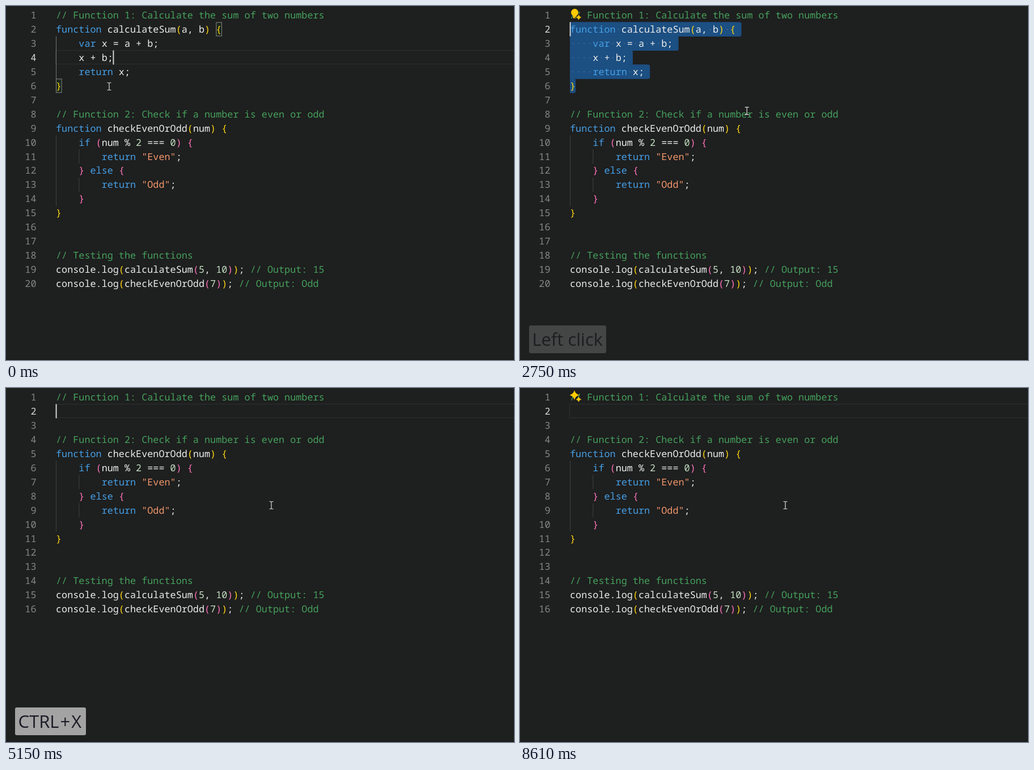
Write an HTML page that moves like this. It is 896 px wide and 625 px high and loops after 9.14 s.

```html
<!DOCTYPE html>
<html lang="en">
<head>
<meta charset="utf-8">
<title>Cutting a function</title>
<style>
html, body { margin: 0; width: 100%; height: 100%; overflow: hidden; background: #1e1f1f; }
svg { display: block; width: 100%; height: 100%; }
.mono { font: 16.808px "Noto Sans Mono", "DejaVu Sans Mono", monospace; text-rendering: geometricPrecision; }
.mono text { white-space: pre; }
.code { font-weight: 500; }
.badge { font: 31px "Open Sans", "Noto Sans", sans-serif; }
</style>
</head>
<body>
<svg id="stage" viewBox="0 0 896 625">
  <rect width="896" height="625" fill="#1e1f1f"/>
  <rect y="623" width="896" height="2" fill="#191a1a"/>
  <g id="back"></g>
  <g id="numbers" class="mono" text-anchor="end"></g>
  <g id="before" class="mono code"></g>
  <g id="after" class="mono code"></g>
  <g id="front"></g>
</svg>
<script>
const LOOP = 9140, LEFT = 88, CHAR = 10.085, ROW = 24.97;
const PRESS = 740, RELEASE = 1850, CUT = 5080;

const full = `// Function 1: Calculate the sum of two numbers
function calculateSum(a, b) {
    var x = a + b;
    x + b;
    return x;
}

// Function 2: Check if a number is even or odd
function checkEvenOrOdd(num) {
    if (num % 2 === 0) {
        return "Even";
    } else {
        return "Odd";
    }
}


// Testing the functions
console.log(calculateSum(5, 10)); // Output: 15
console.log(checkEvenOrOdd(7)); // Output: Odd`.split("\n");
const trimmed = [full[0], "", ...full.slice(6)];

const $ = id => document.getElementById(id);
const rowY = row => 3.5 + (row - 1) * ROW;
const colX = col => LEFT + col * CHAR;
const clamp = (v, lo, hi) => Math.min(hi, Math.max(lo, v));
const rect = (x, y, w, h, attrs) =>
  `<rect x="${x}" y="${y}" width="${w}" height="${h}" ${attrs}/>`;

// Syntax colouring, with bracket colours by nesting depth
function paint(lines) {
  const tokens = /(\/\/.*)|("[^"]*")|\b(function|var|return|if|else)\b|\b(\d+)\b|([({])|([)}])|[^\s]|\s+/g;
  const pair = ["#ffd710", "#ff72b8", "#179fff"];
  let depth = 0;
  return lines.map((line, i) => {
    const code = line.trimStart(), indent = line.length - code.length;
    const spans = code.replace(tokens, (s, note, str, key, num, open, close) => {
      const color = note ? "#45a05c" : str ? "#f0966a" : key ? "#459fe6" : num ? "#c4dfc2"
        : open ? pair[depth++ % 3] : close ? pair[--depth % 3] : "";
      return color ? `<tspan fill="${color}">${s}</tspan>` : s;
    });
    return `<text x="${colX(indent)}" y="${rowY(i + 1) + 18.3}" fill="#ececec">${spans}</text>`;
  }).join("");
}

function star(x, y, r) {
  const k = r * 0.22;
  return `M${x} ${y - r}Q${x + k} ${y - k} ${x + r} ${y}Q${x + k} ${y + k} ${x} ${y + r}` +
    `Q${x - k} ${y + k} ${x - r} ${y}Q${x - k} ${y - k} ${x} ${y - r}Z`;
}

// Pointer way-points: time, x, y
const path = [
  [0, 182, 142], [70, 182, 142], [200, 179, 142], [600, 179, 142], [740, 99, 142],
  [1060, 98, 141], [1290, 74, 83], [1490, 66, 52], [1700, 54, 40], [1960, 50, 35],
  [2190, 50, 35], [2450, 130, 80], [2750, 400, 185], [3080, 468, 207], [LOOP, 468, 207]
];
function pointerAt(t) {
  const i = Math.max(1, path.findIndex(p => p[0] >= t));
  const [t0, x0, y0] = path[i - 1], [t1, x1, y1] = path[i];
  const k = (t - t0) / (t1 - t0);
  return { x: x0 + (x1 - x0) * k, y: y0 + (y1 - y0) * k };
}

function caretAt(t) {
  if (t < PRESS) return { row: 4, col: 10, on: t < 340 };
  if (t >= CUT) {
    const flips = [5610, 6140, 6680, 7150, 7610, 8140, 8610];
    return { row: 2, col: 0, on: flips.filter(f => t >= f).length % 2 === 0 };
  }
  if (t >= 1500) return { row: 2, col: 0, on: Math.floor((t - 1500) / 530) % 2 === 0 };
  const p = pointerAt(t);
  const row = clamp(Math.floor((p.y - 3.5) / ROW) + 1, 2, 6);
  const col = clamp(Math.round((p.x - LEFT) / CHAR), 0, full[row - 1].length);
  return { row, col, on: true };
}

function guides(shift, lit) {
  const bar = (x, from, to, color) =>
    rect(x, rowY(from - shift), 1, (to - from + 1) * ROW, `fill="${color}"`);
  const block = bar(LEFT, 10, 14, "#404141") + bar(colX(4), 11, 11, "#404141") + bar(colX(4), 13, 13, "#404141");
  return block + (shift ? "" : bar(LEFT, 3, 5, lit ? "#747474" : "#404141"));
}

function selection(caret) {
  let out = "", dots = "";
  for (let row = caret.row; row <= 6; row++) {
    const line = full[row - 1];
    const from = row === caret.row ? caret.col : 0;
    const x = colX(from), w = (line.length - from + (row < 6 ? 1 : 0)) * CHAR;
    if (w <= 0) continue;
    const fill = 'fill="#1c4f82"';
    out += rect(x, rowY(row), w, ROW + 0.3, fill + ' rx="3"');
    out += rect(x, rowY(row), w - 4, ROW + 0.3, fill);
    for (let c = from; c < line.length; c++) {
      if (line[c] === " ")
        dots += `<circle cx="${colX(c + 0.5)}" cy="${rowY(row) + 12.8}" r="1" fill="#47709a"/>`;
    }
  }
  return out + dots;
}

function bracketBox(row, col) {
  return rect(colX(col) + 0.5, rowY(row) + 0.5, CHAR - 0.5, ROW - 1,
    'fill="#006400" fill-opacity=".12" stroke="#888"');
}

function badge(t) {
  let label, width, alpha = 1;
  if (t >= PRESS && t < 3620) [label, width, alpha] = ["Left click", 136, 1 - (t - 900) / 2600];
  else if (t >= 4420 && t < CUT) [label, width] = ["CTRL", 85];
  else if (t >= CUT) [label, width, alpha] = ['CTRL<tspan dx="2">+</tspan><tspan dx="2">X</tspan>', 125, 1 - (t - 5800) / 2340];
  if (!label || alpha <= 0) return "";
  return `<g opacity="${Math.min(1, alpha)}">` + rect(16, 564, width, 49, 'rx="3" fill="#a3a3a3"') +
    `<text class="badge" x="21.5" y="599.5" fill="#1b1b26">${label}</text></g>`;
}

function hintIcon(t) {
  const gold = 'fill="#ffcc00"', rim = 'stroke="#1e1f1f" stroke-width="1.5" paint-order="stroke"';
  if (t >= 5410)
    return `<path d="${star(96, 12.5, 8.5)}${star(103.5, 20, 5)}" ${gold}/>`;
  if (t < 1880 || t >= CUT) return "";
  return `<circle cx="96.5" cy="11.5" r="6.5" ${gold}/>` + rect(93.5, 16, 6, 5.5, gold + ' rx="1"') +
    `<path d="${star(103.5, 20, 5)}" ${gold} ${rim}/>`;
}

function pointer(p, pressed) {
  const halo = pressed ? `<circle cx="${p.x - 2}" cy="${p.y - 1}" r="11" fill="#ffee00" opacity=".5"/>` : "";
  const shape = p.x < 64
    ? '<path d="M0 0V14.5L3.4 11.4L5.8 16.6L8 15.6L5.7 10.6H10.2Z" fill="#fff" stroke="#111" stroke-width=".8"/>'
    : '<path d="M-3.5 -6.5H-1L0 -5.8L1 -6.5H3.5M0 -6V6M-3.5 6.5H-1L0 5.8L1 6.5H3.5" fill="none" stroke="#dedede" stroke-width="1.2"/>';
  return halo + `<g transform="translate(${p.x} ${p.y})">${shape}</g>`;
}

$("before").innerHTML = paint(full);
$("after").innerHTML = paint(trimmed);
$("numbers").innerHTML = full.map((_, i) =>
  `<text x="53.5" y="${rowY(i + 1) + 18.3}">${i + 1}</text>`).join("");

function render(t) {
  const cut = t >= CUT, caret = caretAt(t), p = pointerAt(t);
  const selected = !cut && t >= PRESS && (caret.row < 6 || caret.col < 1);
  const inside = !cut && caret.row > 2;

  $("before").style.display = cut ? "none" : "";
  $("after").style.display = cut ? "" : "none";
  [...$("numbers").children].forEach((n, i) => {
    n.setAttribute("fill", i + 1 === caret.row ? "#d8d8d8" : "#858686");
    n.style.display = cut && i >= trimmed.length ? "none" : "";
  });

  const line = selected ? "" :
    rect(LEFT - 0.5, Math.round(rowY(caret.row)) + 0.5, 900, 24, 'fill="none" stroke="#2e2f2f"');
  $("back").innerHTML = line + guides(cut ? 4 : 0, inside) +
    (selected ? selection(caret) : "") +
    (inside ? bracketBox(2, 28) + bracketBox(6, 0) : "");

  const hint = t >= RELEASE && p.x < 64 ? '<circle cx="11" cy="41.5" r="5.5" fill="#7e1a11"/>' : "";
  const bar = caret.on ? rect(colX(caret.col) - 0.3, rowY(caret.row), 1.8, ROW, 'fill="#e0e0e0"') : "";
  $("front").innerHTML = bar + hint + hintIcon(t) + badge(t) +
    pointer(p, t >= PRESS && t < RELEASE);
}

function tick() {
  render(performance.now() % LOOP);
  requestAnimationFrame(tick);
}
tick();
</script>
</body>
</html>
```
